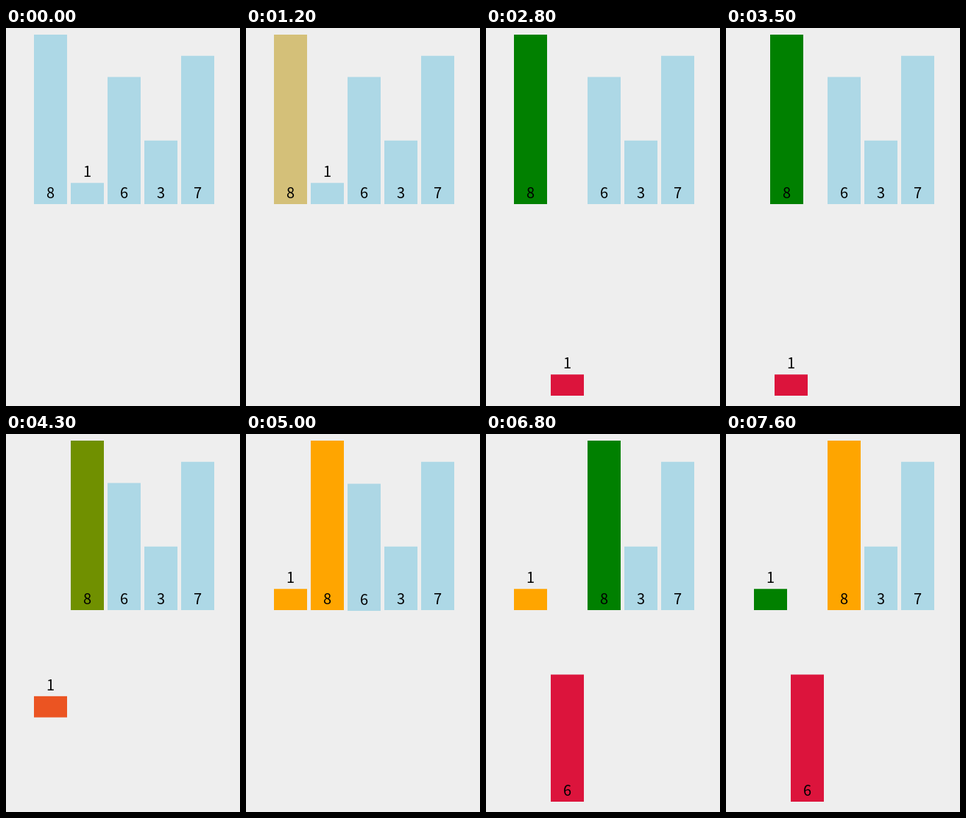
Recreate the animation shown at these times as an HTML page. Size 318x513 px, loop 8 s.

```html
<!DOCTYPE html>
<html lang="en">
<head>
<meta charset="utf-8">
<title>Insertion sort</title>
<style>
html, body { margin: 0; width: 100%; height: 100%; overflow: hidden; background: #eee; }
svg { display: block; }
text { font: 20px "Noto Sans CJK SC", "Noto Sans CJK JP", "Noto Sans", sans-serif; text-anchor: middle; }
</style>
</head>
<body>
<svg id="chart" width="318" height="513"></svg>
<script>
const LOOP = 8000, TICK = 100, DURATION = 240;
const UNIT = 28.75, WIDTH = 45, PITCH = 50, LEFT = 38, BASE = 239, DROP = 260;
const BLUE = [173, 216, 230], ORANGE = [255, 165, 0], GREEN = [0, 128, 0], RED = [220, 20, 60];
const values = [8, 1, 6, 3, 7];

// Each step: start time, then the new properties of the bars, keyed by value
const steps = [
  [1082, { 8: { fill: ORANGE } }],
  [1785, { 1: { drop: 1, fill: RED } }],
  [2585, { 8: { fill: GREEN } }],
  [3385, { 8: { slot: 1 }, 1: { slot: 0 } }],
  [4185, { 8: { fill: ORANGE }, 1: { drop: 0, fill: ORANGE } }],
  [4976, { 6: { drop: 1, fill: RED } }],
  [5758, { 8: { fill: GREEN } }],
  [6570, { 8: { slot: 2 }, 6: { slot: 1 } }],
  [7385, { 8: { fill: ORANGE }, 1: { fill: GREEN } }]
];

const chart = document.getElementById("chart");

function add(parent, tag, attrs) {
  const node = document.createElementNS("http://www.w3.org/2000/svg", tag);
  for (const key in attrs) node.setAttribute(key, attrs[key]);
  return parent.appendChild(node);
}

const bars = values.map(value => {
  const height = value * UNIT;
  const group = add(chart, "g", {});
  const rect = add(group, "rect", { y: BASE - height, width: WIDTH, height });
  const labelY = (value > 1 ? BASE : BASE - height) - 8;
  add(group, "text", { x: WIDTH / 2, y: labelY }).textContent = value;
  return { value, group, rect };
});

const clamp = x => Math.min(1, Math.max(0, x));
const ease = x => x < 0.5 ? 4 * x ** 3 : 1 - 4 * (1 - x) ** 3;
const mix = (a, b, p) => Array.isArray(a) ? a.map((v, i) => mix(v, b[i], p)) : a + (b - a) * p;

function draw(time) {
  bars.forEach(({ value, group, rect }, i) => {
    const state = { slot: i, drop: 0, fill: BLUE };
    for (const [start, changes] of steps) {
      const p = ease(clamp((time - start) / DURATION));
      const goal = changes[value];
      for (const key in goal) state[key] = mix(state[key], goal[key], p);
    }
    group.setAttribute("transform", `translate(${LEFT + state.slot * PITCH} ${state.drop * DROP})`);
    rect.setAttribute("fill", `rgb(${state.fill.map(Math.round)})`);
  });
}

// The picture advances ten times a second
let origin;
function frame(now) {
  origin ??= now;
  draw(Math.floor((now - origin) % LOOP / TICK) * TICK);
  requestAnimationFrame(frame);
}
draw(0);
requestAnimationFrame(frame);
</script>
</body>
</html>
```
